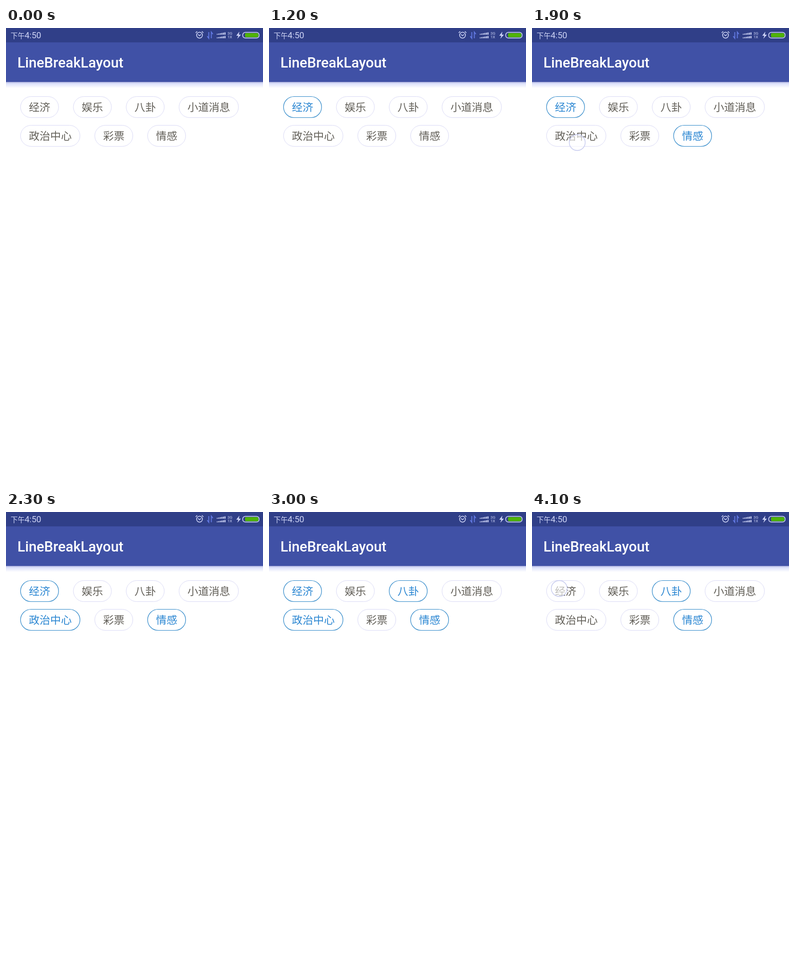
An HTML page for the animation above (4.2 s loop, 500 by 888 pixels).

```html
<!DOCTYPE html>
<html lang="zh-CN">
<head>
<meta charset="utf-8">
<title>LineBreakLayout</title>
<style>
html, body { margin: 0; width: 100%; height: 100%; overflow: hidden; background: #fff; }
svg { display: block; width: 100%; height: 100%; }
text { font-family: Roboto, "Noto Sans CJK SC", "Noto Sans CJK", sans-serif; }
.chip rect { fill: #fff; stroke: #dcdcf6; stroke-width: 1; }
.chip text { fill: #625f58; font-size: 20.8px; text-anchor: middle; }
.chip.on rect { stroke: #3b8fcc; stroke-width: 1.2; }
.chip.on text { fill: #2a86d2; }
.status { fill: #cfd5f6; }
.line { fill: none; stroke: #cfd5f6; stroke-width: 1.5; }
</style>
</head>
<body>
<svg viewBox="0 0 500 888">
  <defs>
    <linearGradient id="shade" x2="0" y2="1">
      <stop offset="0" stop-color="#a9aedb"/>
      <stop offset=".25" stop-color="#dce1fb"/>
      <stop offset="1" stop-color="#fff"/>
    </linearGradient>
  </defs>
  <rect y="105" width="500" height="12" fill="url(#shade)"/>
  <rect width="500" height="105" fill="#4051a6"/>
  <rect width="500" height="28" fill="#303f88"/>
  <text x="22.2" y="77" font-size="27.6" font-weight="500" fill="#fff">LineBreakLayout</text>

  <g class="status">
    <text x="9" y="19.5" font-size="13.8" font-weight="500">下午</text>
    <text x="36.2" y="20" font-size="16.8">4:50</text>
    <g id="signal"></g>
    <text x="431" y="13" font-size="7.4">3G</text>
    <text x="431" y="20" font-size="7.4">1X</text>
    <path d="M454 7l-6 8h4l-2 6 7-8h-4z"/>
  </g>
  <g class="line">
    <circle cx="376.5" cy="14" r="5.7"/>
    <path d="M373.5 12.5l3 2.5 3-2.5M369 9.5l3-3M384 9.5l-3-3"/>
    <rect x="460.5" y="8.5" width="32" height="11" rx="5"/>
  </g>
  <path d="M394.5 8v12l-3-4M399.5 20V8l3 4" fill="none" stroke="#6279e2" stroke-width="1.8"/>
  <rect x="465" y="10" width="26" height="8" rx="2" fill="#4fb207"/>

  <g id="chips"></g>
  <circle id="touch" r="15.5" fill="#fff" fill-opacity=".6" stroke="#c5c9ee" stroke-width="1.3"/>
</svg>
<script>
const LOOP = 4200, GAP = 27.8, EM = 20.8, PAD = 16.7;
const rows = [["经济", "娱乐", "八卦", "小道消息"], ["政治中心", "彩票", "情感"]];
// Each tap: press time, toggle time, release time, position, label
const taps = [
  [800, 800, 1000, 62, 148, "经济"],
  [1400, 1400, 1600, 312, 212, "情感"],
  [1900, 2100, 2200, 88, 223, "政治中心"],
  [2700, 2700, 2900, 262, 157, "八卦"],
  [3300, 3400, 3600, 113, 212, "政治中心"],
  [3900, 4000, 4200, 53, 149, "经济"]
];
const byId = id => document.getElementById(id);

function add(parent, name, attrs) {
  const el = document.createElementNS("http://www.w3.org/2000/svg", name);
  for (const key in attrs) el.setAttribute(key, attrs[key]);
  return parent.appendChild(el);
}

for (const base of [13, 20])
  for (let i = 0; i < 6; i++)
    add(byId("signal"), "rect", { x: 410 + i * 3, y: base - 1.5 - i * .6, width: 2, height: 1.5 + i * .6 });

const chips = {};
rows.forEach((labels, row) => {
  let x = GAP;
  const y = 133.5 + row * 56;
  for (const label of labels) {
    const width = label.length * EM + 2 * PAD;
    const chip = chips[label] = add(byId("chips"), "g", { class: "chip" });
    add(chip, "rect", { x: x + .5, y, width: width - 1, height: 41, rx: 20.5 });
    add(chip, "text", { x: x + width / 2, y: y + 28.5 }).textContent = label;
    x += width + GAP;
  }
});

const start = performance.now();
function draw() {
  const t = (performance.now() - start) % LOOP;
  for (const label in chips) {
    const toggles = taps.filter(tap => tap[5] === label && t >= tap[1]).length;
    chips[label].classList.toggle("on", toggles % 2 === 1);
  }
  const tap = taps.find(([press, , release]) => t >= press && t < release);
  const touch = byId("touch");
  touch.style.display = tap ? "" : "none";
  if (tap) {
    touch.setAttribute("cx", tap[3]);
    touch.setAttribute("cy", tap[4]);
  }
  requestAnimationFrame(draw);
}
draw();
</script>
</body>
</html>
```
